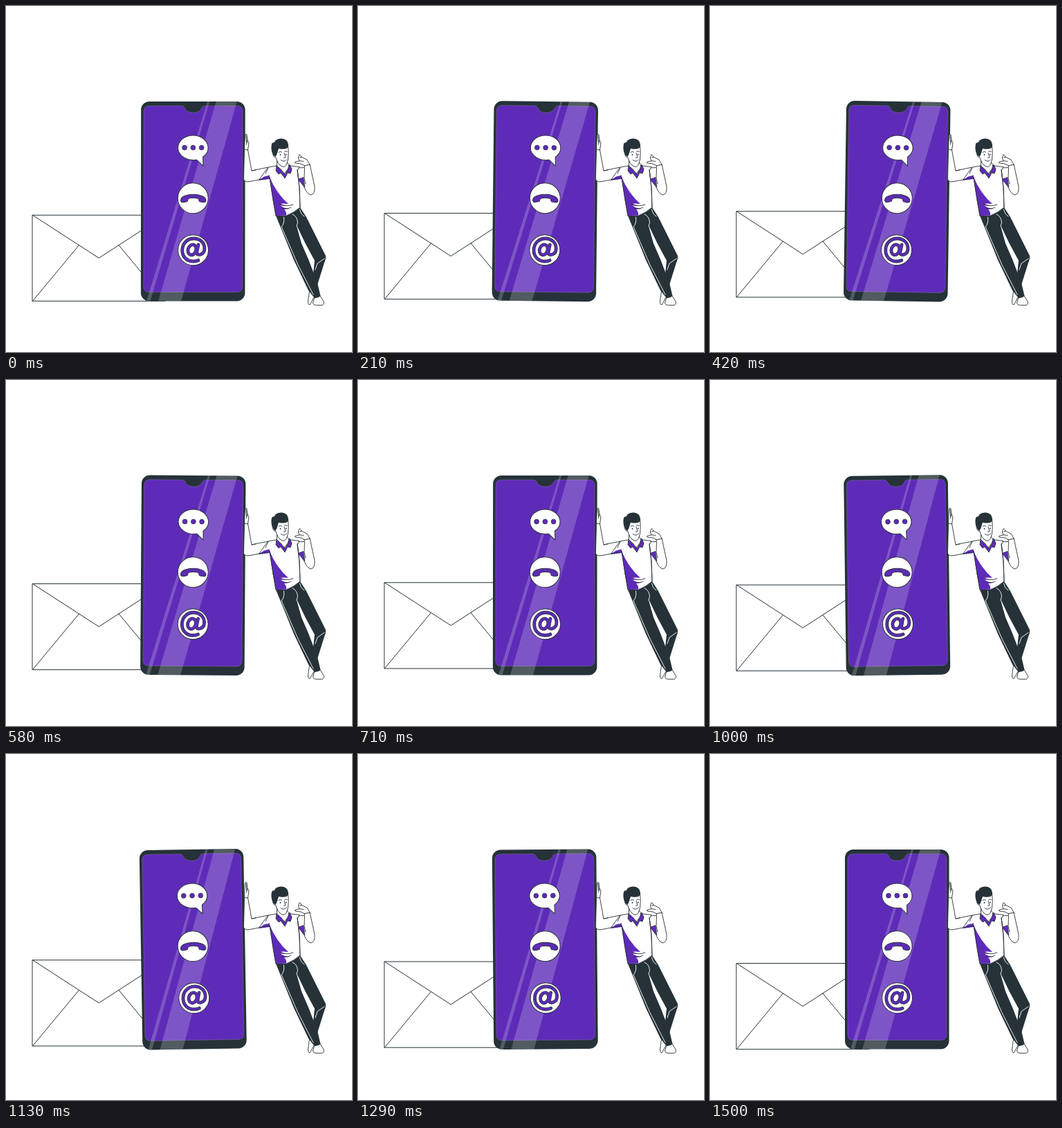
Animation, 500 px wide and 500 px high, one loop 1540 ms. Source, as an HTML page:

```html
<!DOCTYPE html>
<html lang="en">
<head>
<meta charset="utf-8">
<title>Contact us</title>
<style>
  html, body { margin: 0; width: 100%; height: 100%; overflow: hidden; background: #fff; }
  svg { display: block; width: 100%; height: 100%; }
  .line { fill: none; stroke: #263238; stroke-linecap: round; stroke-linejoin: round; }
  .paper { fill: #fff; stroke: #263238; stroke-linecap: round; stroke-linejoin: round; }
  .tint { fill: #5e2bb8; stroke: #263238; stroke-linejoin: round; }
  .dark { fill: #263238; }
  .stitch { fill: none; stroke: #fff; stroke-width: .9; stroke-linecap: round; }
  .shine { fill: #fff; opacity: .2; }
</style>
</head>
<body>
<svg viewBox="0 0 500 500">
  <defs>
    <clipPath id="body"><rect x="195" y="138" width="150.5" height="288.5" rx="12"/></clipPath>
    <g id="at" fill="none" stroke-linecap="round">
      <ellipse cx="269" cy="352.3" rx="5.8" ry="7.6" transform="rotate(18 269 352)"/>
      <path d="M278 345L275.700 356.500C275.700 361.500 287 360 287 350.500C287 341.500 280 336 271.500 336C262 336 254.800 343 254.800 353C254.800 363 262 369 270.500 369C273.500 369 276 368.500 278 367.500"/>
    </g>
  </defs>

  <g id="envelope" class="line">
    <path class="paper" d="M38.400 302.500H230V426.700H38.400Z"/>
    <path d="M38.400 302.500L134.200 364.500L230 302.500M38.400 426.700L105.500 345.900M230 426.700L163 345.900"/>
  </g>

  <g id="phone">
    <rect class="dark" x="195" y="138" width="150.5" height="288.5" rx="12"/>
    <path fill="#5e2bb8" stroke="#8f86a8" stroke-width=".4" d="M207 144.300H253C258 144.300 258 148 260 150.500C265 155.500 276 155.500 281 150.500C283 148 283 144.300 288 144.300H333.700Q341.700 144.300 341.700 152.300V405.500Q341.700 413.500 333.700 413.500H207Q199 413.500 199 405.500V152.300Q199 144.300 207 144.300Z"/>
    <g clip-path="url(#body)">
      <path class="shine" d="M303.500 138H333.500L253 427H220Z"/>
      <path class="shine" d="M291 138H294L208.500 427H203Z"/>
    </g>
    <path class="paper" d="M275.500 222.300C262 224.500 248.500 216.500 248.500 205C248.500 195 258 187 270.300 187C282.500 187 292 195 292 205C292 210 289 215 284.500 218L284.800 231Z"/>
    <g class="tint" stroke-width=".8">
      <circle cx="258" cy="204.700" r="3.400"/>
      <circle cx="270.300" cy="204.700" r="3.400"/>
      <circle cx="282.500" cy="204.700" r="3.400"/>
    </g>
    <circle class="paper" cx="270.200" cy="277.700" r="22"/>
    <path class="tint" d="M252.500 280.500C253 275 262 272.200 270.700 272.200C279 272.200 288 275 289 280.500C289 283.500 287 284 284 283.500L280 282.700C278 282 279.500 279 277.500 278.300C273 277 268 277 264 278.300C262 279 263.500 282 261.500 282.700L257 283.500C254 284 252.500 283.500 252.500 280.500Z"/>
    <circle class="paper" cx="270.600" cy="352.700" r="22"/>
    <use href="#at" stroke="#263238" stroke-width="4.800"/>
    <use href="#at" stroke="#5e2bb8" stroke-width="3.200"/>
  </g>

  <g id="man" stroke-width=".9">
    <!-- shoes -->
    <path class="paper" d="M438.500 412L436.500 427Q436 432 439.500 431.500L445 421Z"/>
    <path class="paper" d="M446 421L443.500 429Q444 432.500 449 432.300H457Q460.500 431 459 427L454 419Z"/>
    <!-- trousers -->
    <path class="dark" d="M425 291L434 305L462 361Q462.500 365 460 371L449 406L443 396L446 368L432 342L412 300Z"/>
    <path class="dark" d="M390 303L405 303L425 291L420 318L427 343L437 366L450 400L454.500 419Q451 422.500 446 422L437 411L416 367Z"/>
    <path class="stitch" d="M401.500 305Q403 314 398 319L422 374L444 417M414 301Q421 304 421.500 313L420 318M424.500 294Q426 301 431 304M460 365L450 372L447 381"/>
    <!-- bracing arm -->
    <path class="paper" d="M344.500 208L345 195L345.500 187Q346.500 183.500 348 186L348.700 193L351 198L349.500 208L355 238L379 233L381 246L366 251L350 254Q344 254 343.500 250Z"/>
    <path class="line" d="M344 207.500L349.500 208M347 187L347.500 197M349 194L347.500 200M355 238L361 237"/>
    <!-- raised arm -->
    <path class="paper" d="M421 234L431 233.500L432 230L439 228.500L446 261Q446.500 272 441 273Q435 272 431 262L423 250Z"/>
    <path class="line" d="M431.500 234L431 249L433 257"/>
    <path class="tint" stroke-width=".6" d="M422.500 250L430 247.500L432 262L424 253Z"/>
    <path class="paper" d="M431 230.500L426 228L418 227Q416.500 225.200 419 225L424 223.800L422.300 219L424.500 214.500L427.500 218.500L435 222L439 229Z"/>
    <path class="line" d="M424 223.800L430 224.500M424.500 219L427.500 218.500"/>
    <!-- shirt -->
    <path class="paper" d="M379 233L391 231L403 236L411 231L424 232.500L421 238L424 262L425 291Q416 299 405 303L390 303L386 280L381 247L366 251Z"/>
    <path fill="#5e2bb8" d="M366 251L373 246.500L381 244.500V250L366 252ZM381 247Q390 270 408 286Q400 285 396 286Q401 288 407 289L397 288.500Q400 292 410 293L402 294Q406 298 405 302.500L390 303L386 280Z"/>
    <path class="line" d="M379 234L375 242M366 251L381 248L386 280L390 303M421 236L424 262L425 291M396 286Q404 291 415 287M399 292Q407 294 412 291"/>
    <path class="tint" d="M391 230L390 238L394 243L397 241L403 249L407 241L411 242L413 236L410 229L404 243Z"/>
    <!-- head -->
    <path class="paper" d="M391.500 219L391.500 231Q398 236 402 242Q409 236 408.500 230L406 225Z"/>
    <path class="paper" d="M388 204L407.500 201Q409 212 407.500 222Q405 232.500 401 232.500Q394 231 391 222L390 219Q385 218 386 212Z"/>
    <path class="dark" d="M389.500 218L386 215.500Q381.500 206 384.500 198L388 197Q389 192 398 191.500Q407 192 408 200Q408 206 403 206.500Q397 207 394 206L391.500 214Z"/>
    <path class="line" d="M394 211.500Q396 209.500 398.500 211M402.500 210.500Q404.500 209 406.500 210.500M402 212.500L404 218.500L401.500 219.500M397 222.500Q401.500 226.500 405.500 222"/>
    <circle class="dark" cx="396.500" cy="215" r=".9"/>
    <circle class="dark" cx="404.800" cy="214.500" r=".9"/>
  </g>
</svg>
<script>
  const LOOP = 1540, CYCLE = 1500, STEP = 1000 / 24;
  const envelope = document.getElementById('envelope');
  const phone = document.getElementById('phone');

  // Triangle wave: 0 at the ends of the cycle, 1 in the middle.
  const triangle = p => 1 - Math.abs(2 * p - 1);

  // Linear swing: 0 -> 1 at a quarter, -1 at three quarters, back to 0.
  const swing = p => 2 * triangle((p + .25) % 1) - 1;

  function draw() {
    const step = Math.floor((performance.now() % LOOP + 4) / STEP);
    const p = Math.min((step + .5) * STEP / CYCLE, 1);
    envelope.setAttribute('transform', `translate(0 ${-10 * triangle(p)})`);
    phone.setAttribute('transform', `rotate(${swing(p)} 270.25 282.25)`);
    requestAnimationFrame(draw);
  }
  draw();
</script>
</body>
</html>
```
